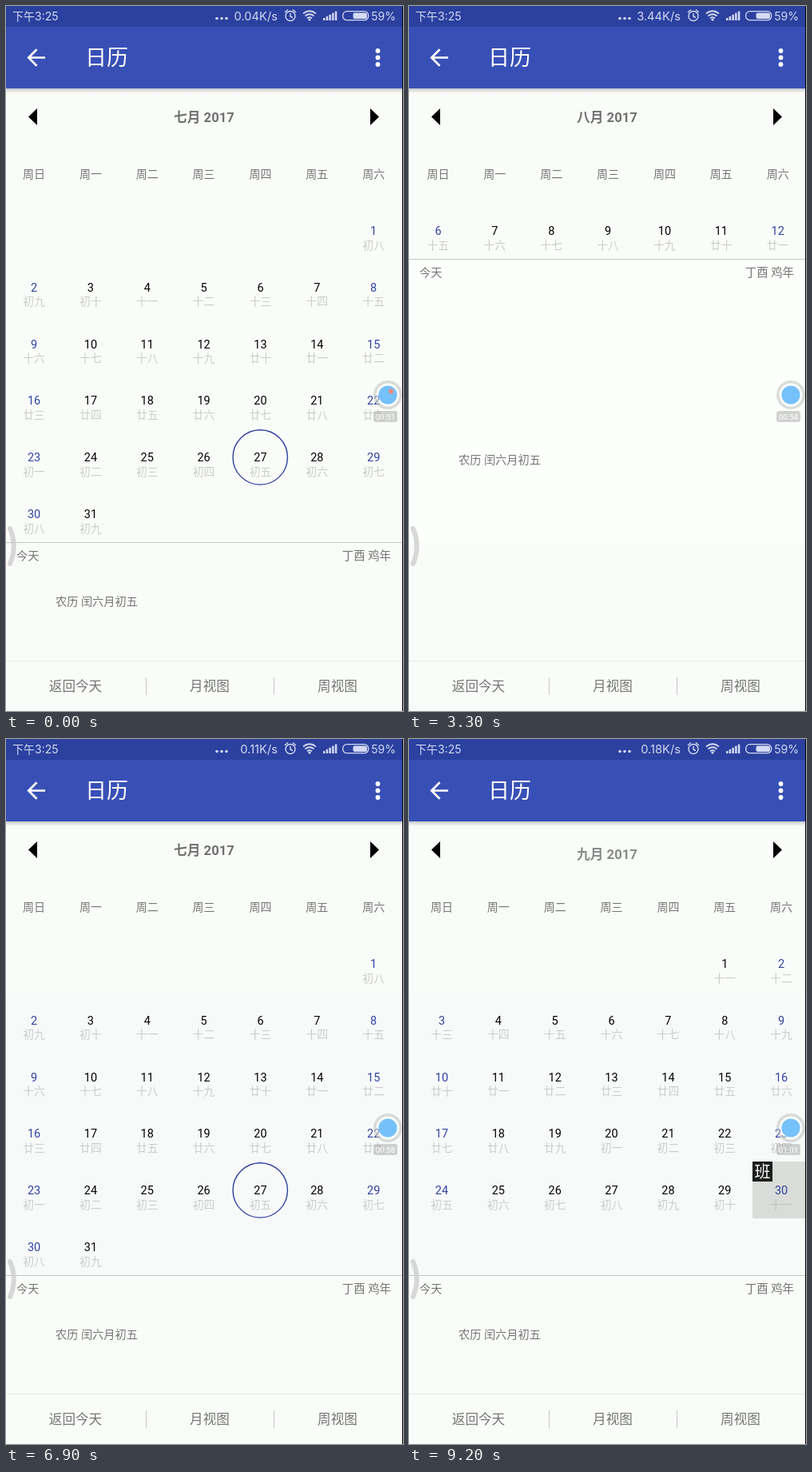
Recreate the animation shown at these times as an HTML page with a canvas. Size 497 by 881 pixels, loop 9300 ms.

```html
<!DOCTYPE html>
<html lang="zh-CN">
<head>
<meta charset="utf-8">
<title>日历</title>
<style>
html, body { margin: 0; width: 100%; height: 100%; overflow: hidden; background: #fafcf9; }
canvas { display: block; }
</style>
</head>
<body>
<canvas id="stage" width="497" height="881"></canvas>
<script>
const c = document.getElementById('stage').getContext('2d');
const LOOP = 9300, W = 496, COL = W / 7, ROW = 70.86, TOP = 280.9;
const WEEK_ON = 700, WEEK_OFF = 5800;
const GRAY = '#747674', BLUE = '#3142a0', PAPER = '#fafcf9';
const FONT = 'Roboto, "Noto Sans CJK SC", "Noto Sans CJK", sans-serif';
const STATUS_FONT = 'Inter, "Noto Sans CJK SC", "Noto Sans CJK", sans-serif';
const DIGITS = '一二三四五六七八九十';
const MONTHS = [{ name: '七月', first: 0, days: 31 }, { name: '八月', first: 31, days: 31 }, { name: '九月', first: 62, days: 30 }];
const NEW_MOONS = [-7, 22, 52, 81];
const TODAY = 26, WORKDAY = 91;           // days counted from 1 July
const WEEK_SWIPES = [2270, 2915, 3660, 4630], MONTH_SWIPES = [7750, 8871];
const WEEK_TITLES = [2915], MONTH_TITLES = [7900, 8885];
const TICKS = [700, 1700, 2500, 3400, 4400, 5300, 6300, 7200, 8500, 9200];
const BLINKS = [300, 700, 1400, 1700, 2300, 2600, 3100, 3500, 3900, 4400, 4700, 5100, 5800, 6300, 6900, 7200, 7800, 8500, 8900];
const SPEED_TIMES = [300, 3700, 7600], SPEEDS = ['0.04', '3.44', '0.11', '0.18'];

const clamp = v => Math.max(0, Math.min(1, v));
const passed = (times, t) => times.filter(s => t >= s).length;
const swiped = (starts, t) => starts.reduce((sum, s) => sum + 1 - (1 - clamp((t - s) / 560)) ** 5, 0);

function text(s, x, y, size, color, align = 'center', weight = 400, family = FONT) {
  c.font = `${weight} ${size}px ${family}`;
  c.textAlign = align;
  c.fillStyle = color;
  c.fillText(s, x, y + size * 0.34);
}
function rect(x, y, w, h, color) {
  c.fillStyle = color;
  c.fillRect(x, y, w, h);
}
function disc(x, y, r, color) {
  c.fillStyle = color;
  c.beginPath();
  c.arc(x, y, r, 0, 7);
  c.fill();
}
function ring(x, y, r, color, width) {
  c.strokeStyle = color;
  c.lineWidth = width;
  c.beginPath();
  c.arc(x, y, r, 0, 7);
  c.stroke();
}
function pill(x, y, w, h, r) {
  c.beginPath();
  c.roundRect(x, y, w, h, r);
}
function stroke(d, color, width, cap = 'butt') {
  c.strokeStyle = color;
  c.lineWidth = width;
  c.lineCap = cap;
  c.stroke(new Path2D(d));
}

function lunar(day) {
  const n = day - NEW_MOONS.filter(s => s <= day).pop() + 1;
  if (n === 30) return '三十';
  return (n <= 10 ? '初' : n < 20 ? '十' : '廿') + DIGITS[(n - 1) % 10];
}

function drawDay(day, left, row) {
  const col = (day + 6) % 7, x = left + COL * (col + 0.5) - 0.4, y = TOP + ROW * row;
  const month = MONTHS.filter(m => m.first <= day).pop();
  const boxX = Math.round(x - 36), boxY = Math.round(y - 36);
  if (day === WORKDAY) rect(boxX, boxY, COL + 1, 71, '#dadcd9');
  text(day - month.first + 1, x, y, 14.5, col % 6 ? '#000' : BLUE);
  text(lunar(day), x, y + 18, 13.8, day === WORKDAY ? '#bfc1be' : '#cbcdca');
  if (day === TODAY) ring(x - 0.2, y - 0.4, 34.2, BLUE, 1.4);
  if (day === WORKDAY) {
    rect(boxX, boxY, 25, 25, '#1c1e1c');
    text('班', boxX + 12.5, boxY + 13, 20, '#fff');
  }
}

function drawPage(page, left, week) {
  for (let i = 0; i < 7; i++) text('周' + '日一二三四五六'[i], left + COL * (i + 0.5) - 0.4, 210, 14, GRAY);
  if (week) {
    for (let i = 0; i < 7; i++) drawDay(22 + 7 * page + i, left, 0);
    return;
  }
  const { first, days } = MONTHS[page], lead = (first + 6) % 7;
  for (let i = 0; i < days; i++) drawDay(first + i, left, Math.floor((lead + i) / 7));
}

function drawTitle(t, starts) {
  let month = passed(starts, t), shift = 0, alpha = 1;
  if (month) {
    const age = t - starts[month - 1], leaving = age < 200;
    const left = (1 - clamp((leaving ? age : age - 200) / 200)) ** 2;
    shift = 27.6 * (leaving ? left - 1 : left);
    alpha = leaving ? left : 1 - left;
    if (leaving) month--;
  }
  c.globalAlpha = alpha;
  text(MONTHS[month].name + ' 2017', 248, 139 + shift, 16.7, '#6f716f', 'center', 700);
  c.globalAlpha = 1;
}

function drawStatus(t) {
  const ink = '#d3daf2';
  rect(0, 0, W, 26, '#2b409f');
  text('下午3:25', 8, 13, 14, ink, 'left', 400, STATUS_FONT);
  for (const x of [264, 270, 276]) disc(x, 15.5, 1.8, ink);
  text(SPEEDS[passed(SPEED_TIMES, t)] + 'K/s', 340, 13, 14.7, ink, 'right', 400, STATUS_FONT);
  text('59%', 488, 13, 14, ink, 'right', 400, STATUS_FONT);
  ring(356, 12.5, 6, ink, 1.4);
  stroke('M356 9v4l3 1.5M349 8l4 -3.5M363 8l-4 -3.5', ink, 1.4);
  stroke('M372 9.5Q380 3 388 9.5M374.5 12.5Q380 8 385.5 12.5M377 15.2Q380 13 383 15.2', ink, 1.7);
  disc(380, 17, 1.6, ink);
  for (let i = 0; i < 5; i++) rect(397 + i * 3.7, 15 - i * 2.1, 2.5, 3 + i * 2.1, ink);
  pill(421.7, 6.7, 32, 11, 5);
  c.strokeStyle = ink;
  c.lineWidth = 1.3;
  c.stroke();
  pill(434.5, 8.5, 17.5, 7.5, 2);
  c.fillStyle = ink;
  c.fill();
}

function drawAppBar() {
  const shade = c.createLinearGradient(0, 103, 0, 109);
  shade.addColorStop(0, '#c9ccd0');
  shade.addColorStop(1, PAPER);
  rect(0, 103, W, 6, shade);
  rect(0, 26, W, 77, '#3850b6');
  stroke('M49 64.5H28.5M38.5 54.3L28.3 64.5L38.5 74.7', '#fff', 2.7);
  text('日历', 99, 65, 27, '#fff', 'left');
  for (const y of [56, 64.5, 73]) disc(465.5, y, 2.9, '#fff');
}

function drawFooter(line) {
  rect(0, line, W, 1, '#c6c8c5');
  text('今天', 13, line + 17.5, 14.2, GRAY, 'left');
  text('丁酉 鸡年', 482, line + 17.5, 14.4, GRAY, 'right');
  text('农历 闰六月初五', 62, (line + 819) / 2, 14.2, GRAY, 'left');
  rect(0, 818, W, 1, '#e6e8e5');
  text('返回今天', 87, 850.5, 16.6, GRAY);
  text('月视图', 255, 850.5, 16.6, GRAY);
  text('周视图', 415, 850.5, 16.6, GRAY);
  for (const x of [175, 335]) rect(x, 839, 1, 22, '#c6c8c5');
}

function drawRecorder(t) {
  stroke('M5 653Q14.5 675 5 697', 'rgba(205,207,205,.8)', 6, 'round');
  disc(478, 486, 14.5, 'rgba(255,255,255,.4)');
  ring(478, 486, 16.2, 'rgba(195,199,195,.6)', 3.6);
  disc(478, 486, 11.6, '#75c1fb');
  if (passed(BLINKS, t) % 2 === 0) disc(482, 481.5, 3, '#f28a7c');
  const s = 51 + passed(TICKS, t), pad = n => String(n).padStart(2, '0');
  pill(460, 506, 30, 14, 3);
  c.fillStyle = 'rgba(165,168,165,.5)';
  c.fill();
  text(`${pad(Math.floor(s / 60))}:${pad(s % 60)}`, 475, 513.3, 9.8, '#fff');
}

function draw(t) {
  const week = t >= WEEK_ON && t < WEEK_OFF;
  rect(0, 0, 497, 881, PAPER);
  if (t >= WEEK_ON) rect(0, 317, W, 354, week ? '#fdfffc' : '#f8fafa');
  const pos = swiped(week ? WEEK_SWIPES : MONTH_SWIPES, t), page = Math.floor(pos);
  const left = (page - pos) * W;
  drawPage(page, left, week);
  if (left < 0) drawPage(page + 1, left + W, week);
  drawTitle(t, t < WEEK_OFF ? WEEK_TITLES : MONTH_TITLES);
  c.fillStyle = '#000';
  c.fill(new Path2D('M28 138.5L39 128V149ZM467 138.5L456 128V149Z'));
  drawFooter(week ? 316 : 670);
  drawAppBar();
  drawStatus(t);
  drawRecorder(t);
  rect(W, 0, 1, 881, '#000');
}

function frame() {
  draw(Math.floor(performance.now() % LOOP / 100) * 100);
  requestAnimationFrame(frame);
}
frame();
</script>
</body>
</html>
```
